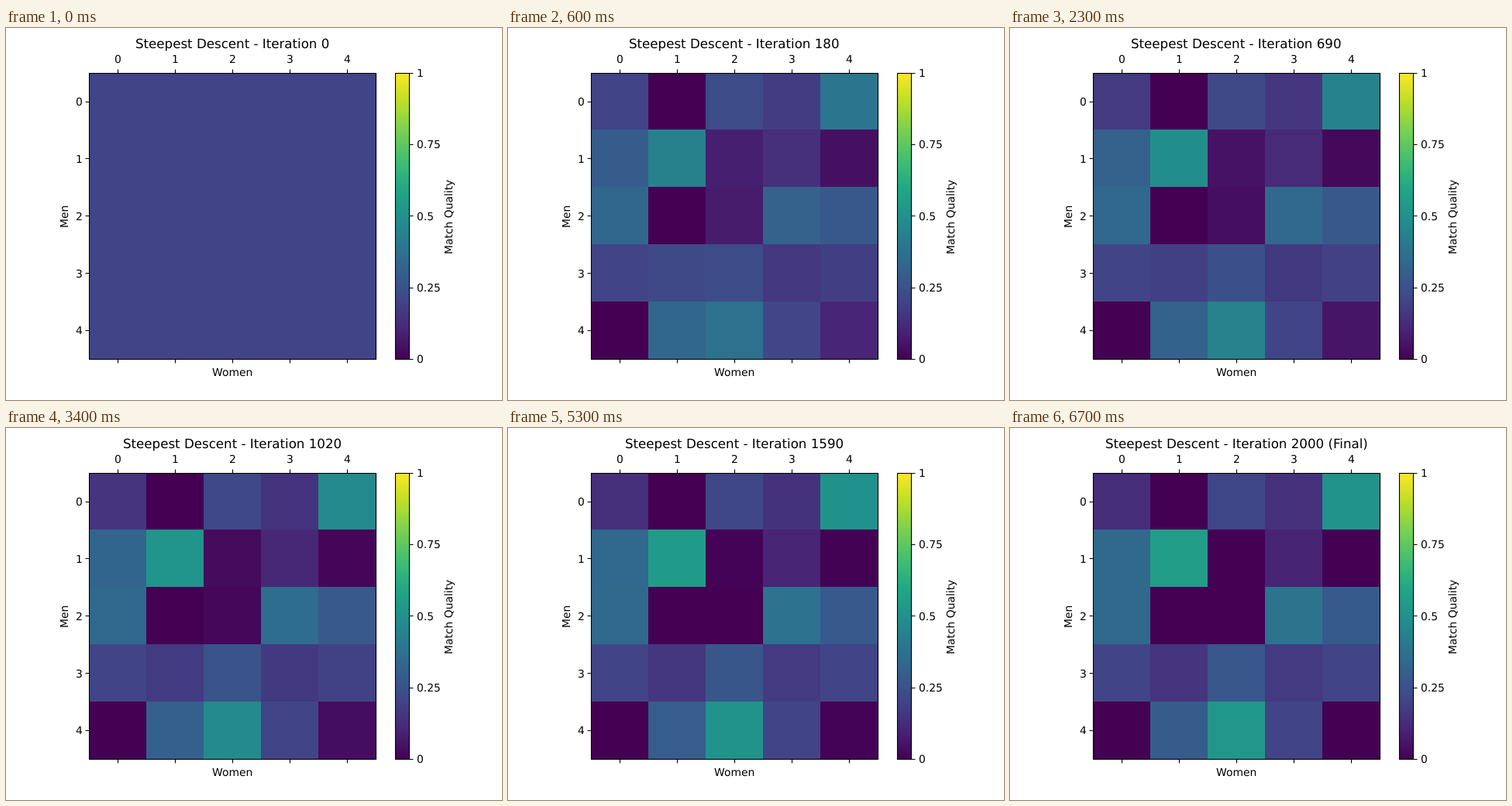
Recreate the animation shown at these times as an HTML page. Size 640 px wide and 480 px high, loop 6800 ms.

```html
<!DOCTYPE html>
<html lang="en">
<head>
<meta charset="utf-8">
<title>Steepest Descent</title>
<style>
  html, body { margin: 0; width: 100%; height: 100%; overflow: hidden; background: #fff; }
  svg { display: block; width: 640px; height: 480px; }
  text {
    font: 13.889px "DejaVu Sans", Verdana, sans-serif;
    text-rendering: geometricPrecision;
    white-space: pre;
  }
  #title { font-size: 16.667px; }
  .line { fill: none; stroke: #000; stroke-width: 1.11; }
  #cells { shape-rendering: crispEdges; }
</style>
</head>
<body>
<svg viewBox="0 0 640 480">
  <defs>
    <linearGradient id="scale" gradientUnits="userSpaceOnUse" x1="0" y1="427.2" x2="0" y2="57.6"></linearGradient>
    <clipPath id="plot"><rect x="107" y="58" width="371" height="370"/></clipPath>
  </defs>
  <g id="cells" clip-path="url(#plot)"></g>
  <rect x="502" y="58" width="18.5" height="369.5" fill="url(#scale)"/>
  <rect class="line" x="107.5" y="58.5" width="370" height="369"/>
  <rect class="line" x="502.5" y="58.5" width="18" height="369"/>
  <path id="ticks" class="line"/>
  <g id="labels"></g>
  <text id="title" y="26"></text>
</svg>
<script>
const FRAME = 100, FRAMES = 68, STEP = 30, LAST = 2000, N = 5;
const LEFT = 107.2, TOP = 57.6, SIDE = 369.6, CELL = SIDE / N;
const CENTRE = LEFT + SIDE / 2;

const viridis = ['440154', '482475', '414487', '355f8d', '2a788e', '21918c',
                 '22a884', '44bf70', '7ad151', 'bddf26', 'fde725'];
const stops = viridis.map(hex => [0, 2, 4].map(i => parseInt(hex.slice(i, i + 2), 16)));

// Percentages after the first step and at the end; the last row and column follow from the sums.
const TOTAL = 99;
const first = complete([[21, 0, 23, 18], [28, 42, 10, 14], [33, 0, 9, 30], [20, 23, 22, 16]]);
const final = complete([[13, 0, 21, 14], [34, 55, 0, 10], [34, 0, -1, 38], [20, 15, 27, 17]]);

function complete(block) {
  const rest = list => TOTAL - list.reduce((a, b) => a + b);
  const rows = [...block, block[0].map((_, j) => rest(block.map(row => row[j])))];
  return rows.flatMap(row => [...row, rest(row)]);
}

const $ = id => document.getElementById(id);
const mix = (a, b, u) => a + (b - a) * u;
const snap = v => Math.round(v) + 0.5;

function add(parent, tag, attrs, text = '') {
  const el = document.createElementNS('http://www.w3.org/2000/svg', tag);
  for (const key in attrs) el.setAttribute(key, attrs[key]);
  el.textContent = text;
  parent.appendChild(el);
  return el;
}

// Texts start on whole pixels; align is the share of the width before the anchor.
function label(text, x, y, align = 0) {
  const el = add($('labels'), 'text', { y: Math.round(y) }, text);
  el.setAttribute('x', Math.round(x - align * el.getComputedTextLength()));
}

function upright(text, x, y) {
  const el = add($('labels'), 'text', {}, text);
  const base = Math.round(y + el.getComputedTextLength() / 2);
  el.setAttribute('transform', `translate(${x} ${base}) rotate(-90)`);
}

function colour(v) {
  const p = Math.min(Math.max(v, 0), 1) * 10;
  const i = Math.min(Math.floor(p), 9);
  return `rgb(${stops[i].map((c, j) => Math.round(mix(c, stops[i + 1][j], p - i)))})`;
}

function valueAt(cell, iter) {
  if (iter < STEP) return 1 / N;
  const u = 1 - (1 - (iter - STEP) / (LAST - STEP)) ** 1.8;
  return mix(first[cell], final[cell], u) / 100;
}

stops.forEach((c, i) => add($('scale'), 'stop', { offset: i / 10, 'stop-color': `rgb(${c})` }));

const cells = Array.from({ length: N * N }, (_, i) => add($('cells'), 'rect', {
  x: 107 + 74 * (i % N), y: 57 + 74 * Math.floor(i / N), width: 74, height: 74
}));

let ticks = '';
for (let i = 0; i < N; i++) {
  const x = LEFT + CELL * (i + 0.5), y = TOP + CELL * (i + 0.5);
  const barY = TOP + SIDE * (1 - i / 4);
  ticks += `M${snap(x)} 58.5v-5M${snap(x)} 427.5v5M107.5 ${snap(y)}h-5M520.5 ${snap(barY)}h5`;
  label(i, x + 0.3, 45, 0.5);
  label(i, 98.4, y + 5.2, 1);
  label(i / 4, 530, barY + 5.2);
}
$('ticks').setAttribute('d', ticks);
label('Women', CENTRE, 449, 0.5);
upright('Men', 80, 243.5);
upright('Match Quality', 576, 243.5);

let shown = -1;
const start = performance.now();

function draw() {
  const frame = Math.floor((performance.now() - start) / FRAME) % FRAMES;
  if (frame !== shown) {
    shown = frame;
    const iter = Math.min(frame * STEP, LAST);
    const title = $('title');
    title.textContent = `Steepest Descent - Iteration ${iter}${iter === LAST ? ' (Final)' : ''}`;
    title.setAttribute('x', Math.round(CENTRE - title.getComputedTextLength() / 2));
    cells.forEach((cell, i) => cell.setAttribute('fill', colour(valueAt(i, iter))));
  }
  requestAnimationFrame(draw);
}
draw();
</script>
</body>
</html>
```
